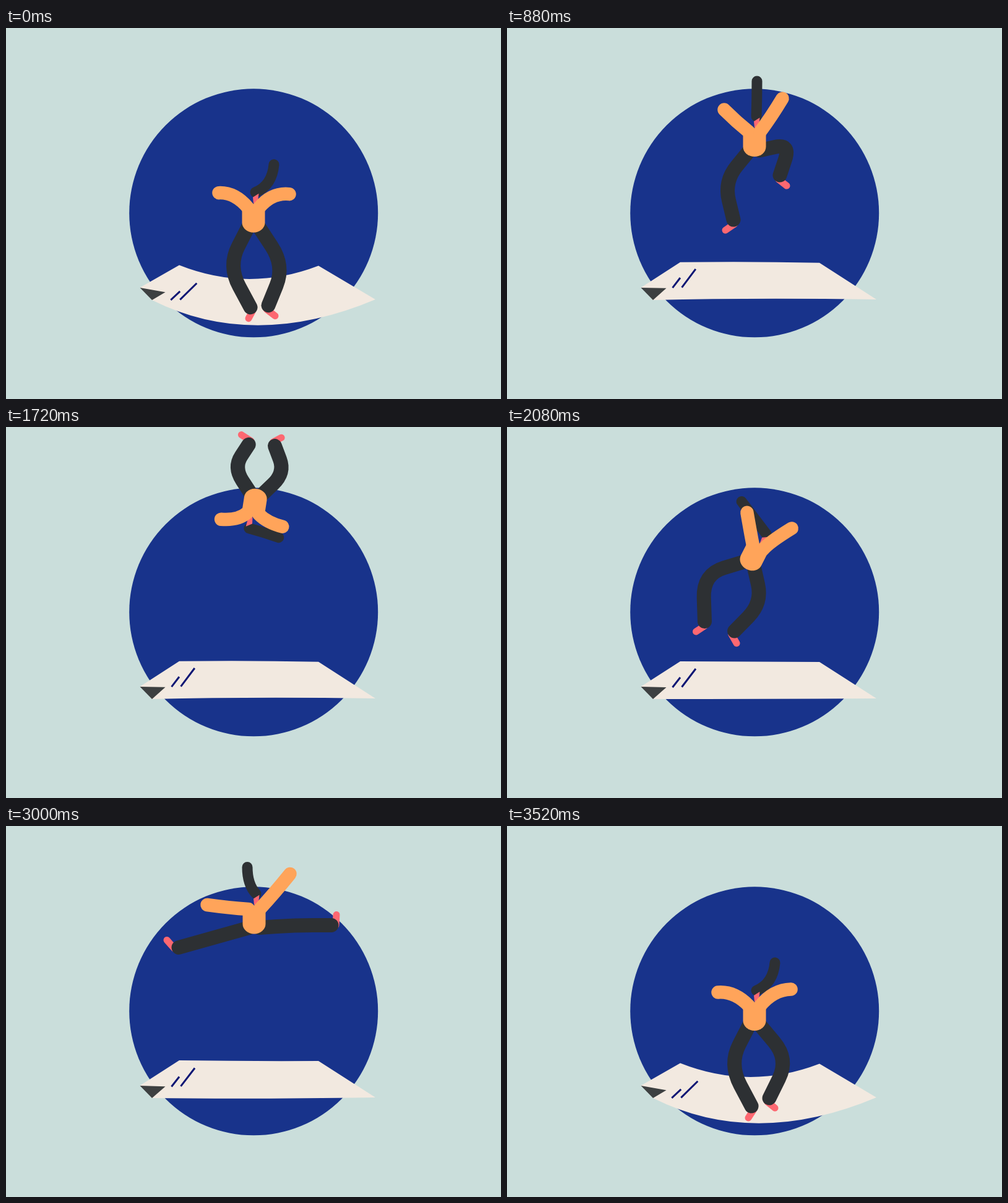
These frames come from a looping animation (800x600 px, 3.56 s). An HTML page with a canvas:

```html
<!DOCTYPE html>
<html lang="en">
<head>
<meta charset="utf-8">
<title>Bounce</title>
<style>
  html, body { margin: 0; width: 100%; height: 100%; overflow: hidden; background: #cadedb; }
  canvas { display: block; width: 800px; height: 600px; }
</style>
</head>
<body>
<canvas id="stage" width="800" height="600"></canvas>
<script>
const ctx = document.getElementById('stage').getContext('2d');
const LOOP = 3560, STEP = 40;
const BG = '#cadedb', BLUE = '#18338b', PAPER = '#f2e9e0', FOLD = '#3d4041', INK = '#0b1674';
const DARK = '#2d3033', ORANGE = '#ffa45a', PINK = '#fd6871';

// Limb points relative to the hip. Arms and hair: bend, end. Legs: knee, ankle, toe.
const dip = {
  hair: [30, -76, 33, -110],
  armL: [-30, -65, -56, -64], armR: [30, -65, 58, -62],
  legL: [-41, 54, -5, 121, -8, 139], legR: [50, 54, 24, 118, 35, 135]
};
const settle = {
  ...dip,
  armL: [-32, -64, -59, -62], armR: [30, -66, 59, -67],
  legL: [-41, 54, -5, 122, -10, 141], legR: [55, 46, 24, 109, 33, 125]
};
const stand = {
  hair: [-14, -48, -28, -25],
  armL: [-28, -10, -47, 19], armR: [28, -12, 49, 16],
  legL: [-11, 50, -15, 111, -31, 123], legR: [20, 43, 32, 96, 51, 104]
};
const tuck = {
  hair: [-20, -66, -42, -58],
  armL: [-34, -38, -62, -28], armR: [34, -40, 62, -34],
  legL: [-40, 38, -28, 98, -42, 113], legR: [44, 16, 36, 66, 50, 80]
};
const kick = {
  hair: [4, -94, 4, -122],
  armL: [-30, -57, -49, -76], armR: [27, -64, 45, -94],
  legL: [-49, 40, -34, 102, -47, 119], legR: [58, -21, 41, 30, 52, 47]
};
const reach = {
  hair: [6, -94, 10, -121],
  armL: [-30, -58, -55, -76], armR: [30, -58, 55, -80],
  legL: [-22, 48, -13, 106, -23, 124], legR: [28, 46, 24, 102, 36, 118]
};
const lean = {
  hair: [-20, -47, -35, -46],
  armL: [-24, -40, -48, -30], armR: [22, -47, 48, -30],
  legL: [-12, 47, -17, 103, -34, 116], legR: [20, 42, 30, 94, 46, 104]
};
const flip = {
  hair: [-22, -70, -48, -76],
  armL: [-24, -52, -50, -58], armR: [22, -56, 50, -62],
  legL: [-44, 32, -18, 72, -26, 87], legR: [44, 28, 24, 68, 38, 82]
};
const fold = {
  hair: [-24, -78, -57, -94],
  armL: [-17, -50, -41, -82], armR: [13, -56, 35, -92],
  legL: [-59, 39, -22, 106, -27, 127], legR: [47, 37, 28, 98, 40, 114]
};
const cheer = {
  hair: [-22, -70, -34, -84],
  armL: [-24, -78, -36, -108], armR: [22, -78, 36, -114],
  legL: [-50, 12, -92, 54, -110, 50], legR: [52, 4, 98, 24, 112, 14]
};
const split = {
  hair: [-11, -80, -11, -108],
  armL: [-40, -42, -76, -47], armR: [33, -66, 58, -97],
  legL: [-65, 6, -122, 22, -141, 10], legR: [65, -14, 125, -14, 133, -31]
};

const poses = [
  [0, dip], [200, stand], [600, tuck], [880, kick], [1013, reach], [1200, dip],
  [1400, lean], [1764, flip], [2080, fold], [2346, dip], [2560, stand], [2760, { ...stand, hair: tuck.hair }],
  [2900, cheer], [3000, split], [3284, reach], [3520, settle], [LOOP, dip]
];
const spin = [[0, 0], [1280, 0], [1400, -31], [2080, -333], [2180, -360], [LOOP, -360]];
const hipX = [[0, 400], [1250, 400], [1400, 404], [2080, 399], [2300, 400], [2560, 401], [3000, 401], [LOOP, 400]];
const sag = [
  [0, 41], [120, 26], [215, -7], [300, 4], [400, -3], [520, 1], [880, -2], [1013, -1],
  [1200, 41], [1320, 36], [1400, 20], [1480, -8], [1570, 4], [1700, -2], [1850, 0], [2167, 0],
  [2346, 41], [2470, 14], [2560, -6], [2650, 4], [2760, -2], [3000, 1], [3284, 1], [3520, 41], [LOOP, 41]
];

// Smooth interpolation through the keys without overshoot.
function sample(keys, t, get = v => v) {
  let i = 0;
  while (i < keys.length - 2 && t >= keys[i + 1][0]) i++;
  const time = k => keys[k][0], val = k => get(keys[k][1]);
  const slope = k => keys[k] && keys[k + 1] ? (val(k + 1) - val(k)) / (time(k + 1) - time(k)) : 0;
  const tangent = k => {
    const a = slope(k - 1), b = slope(k);
    return a * b > 0 ? 2 * a * b / (a + b) : 0;
  };
  const h = time(i + 1) - time(i), u = (t - time(i)) / h, v = 1 - u;
  return val(i) * (1 + 2 * u) * v * v + tangent(i) * h * u * v * v
       + val(i + 1) * u * u * (3 - 2 * u) - tangent(i + 1) * h * u * u * v;
}

const poseAt = t => Object.fromEntries(Object.keys(dip).map(part =>
  [part, dip[part].map((_, i) => sample(poses, t, p => p[part][i]))]));

// Ballistic flights joined by dips into the sheet.
const GRAVITY = 0.00083, FLOOR = 285, DEPTH = 46;
const jumps = [[600, 143], [1764, 150], [2905, 167]].map(([peak, top]) => {
  const half = Math.sqrt((FLOOR - top) / GRAVITY);
  return { peak, top, start: peak - half, end: peak + half };
});
function hipY(t) {
  const air = jumps.find(j => t >= j.start && t <= j.end);
  if (air) return air.top + GRAVITY * (t - air.peak) ** 2;
  const n = jumps.findIndex(j => t < j.start);
  const next = n < 0 ? jumps[0].start + LOOP : jumps[n].start;
  const prev = n < 0 ? jumps[2].end : n ? jumps[n - 1].end : jumps[2].end - LOOP;
  const u = (t - prev) / (next - prev);
  return FLOOR + DEPTH * (1 - Math.abs(2 * u - 1) ** 3);
}

function fill(color, ...pts) {
  ctx.beginPath();
  pts.forEach(p => ctx.lineTo(...p));
  ctx.closePath();
  ctx.fillStyle = color;
  ctx.fill();
}
function stroke(color, width) {
  ctx.strokeStyle = color;
  ctx.lineWidth = width;
  ctx.stroke();
}
function bend(x, y, curve, color, width) {
  ctx.beginPath();
  ctx.moveTo(x, y);
  ctx.quadraticCurveTo(...curve);
  stroke(color, width);
}

function sheet(d) {
  const edge = 379.5 + 0.11 * d;
  ctx.beginPath();
  ctx.moveTo(217, 419.5);
  ctx.lineTo(280, edge - 0.5);
  ctx.quadraticCurveTo(392, 379.5 + 1.18 * d, 505, edge + 0.5);
  ctx.lineTo(597, 439);
  ctx.quadraticCurveTo(400, 440 + 2 * d, 236, 440);
  ctx.closePath();
  ctx.fillStyle = PAPER;
  ctx.fill();
  fill(FOLD, [216.5, 420], [257.5, 421 + 0.15 * d], [236, 440]);
  ctx.lineCap = 'butt';
  ctx.beginPath();
  ctx.moveTo(267.5 - 0.03 * d, 421 + 0.46 * d);
  ctx.lineTo(280 + 0.03 * d, 405 + 0.51 * d);
  ctx.moveTo(282.5 - 0.03 * d, 420.5 + 0.46 * d);
  ctx.lineTo(305 + 0.08 * d, 391 + 0.53 * d);
  stroke(INK, 3);
}

function leg(side, [kx, ky, ax, ay, fx, fy]) {
  const hx = 8 * side, hy = -10;
  const shin = Math.hypot(ax - kx, ay - ky);
  ctx.beginPath();
  ctx.moveTo(ax + (ax - kx) / shin * 7, ay + (ay - ky) / shin * 7);
  ctx.lineTo(fx, fy);
  stroke(PINK, 11);
  ctx.beginPath();
  ctx.moveTo(hx, hy);
  ctx.lineTo((hx + kx) / 2, (hy + ky) / 2);
  ctx.quadraticCurveTo(kx, ky, (kx + ax) / 2, (ky + ay) / 2);
  ctx.lineTo(ax, ay);
  stroke(DARK, 23);
}

function figure(t) {
  const p = poseAt(t);
  ctx.save();
  ctx.translate(sample(hipX, t), hipY(t) - 26);
  ctx.rotate(sample(spin, t) * Math.PI / 180);
  ctx.translate(0, 26);
  ctx.lineCap = ctx.lineJoin = 'round';
  leg(-1, p.legL);
  leg(1, p.legR);
  bend(3, -65, p.hair, DARK, 17);
  fill(PINK, [-1, -57], [8.5, -63], [7, -50], [5, -47], [0, -47]);
  bend(-9, -40, p.armL, ORANGE, 21.5);
  bend(9, -40, p.armR, ORANGE, 21.5);
  ctx.beginPath();
  ctx.moveTo(-18.5, -37);
  ctx.lineTo(18.5, -37);
  ctx.ellipse(0, -16, 18.5, 16, 0, 0, Math.PI);
  ctx.closePath();
  ctx.fillStyle = ORANGE;
  ctx.fill();
  ctx.restore();
}

function draw() {
  const t = Math.floor(performance.now() % LOOP / STEP) * STEP;
  ctx.fillStyle = BG;
  ctx.fillRect(0, 0, 800, 600);
  ctx.beginPath();
  ctx.arc(400.2, 299.3, 201, 0, 2 * Math.PI);
  ctx.fillStyle = BLUE;
  ctx.fill();
  sheet(sample(sag, t));
  figure(t);
  requestAnimationFrame(draw);
}
draw();
</script>
</body>
</html>
```
